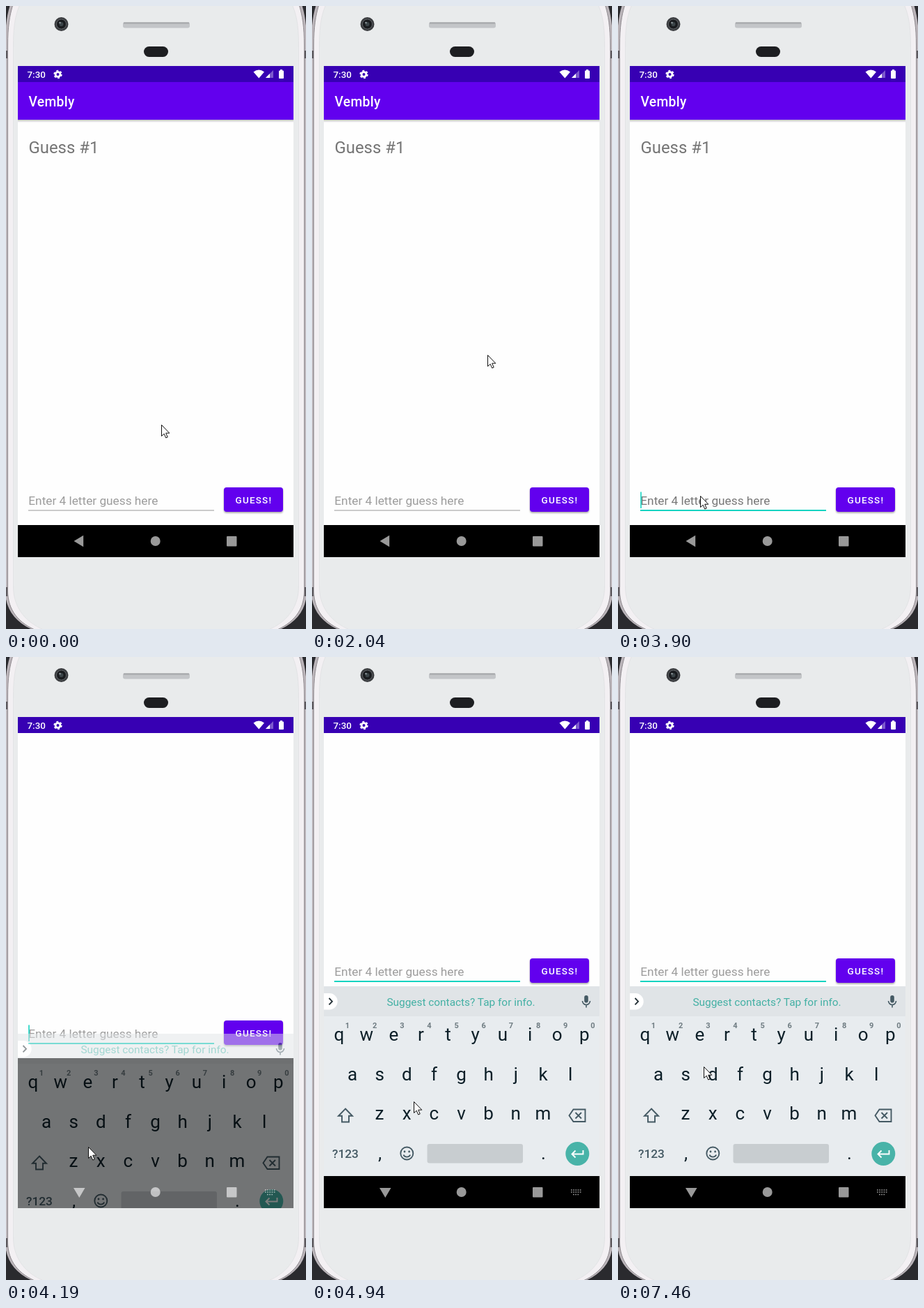
Write an HTML page that moves like this. It is 431 px wide and 893 px high and loops after 8000 ms.

```html
<!DOCTYPE html>
<html lang="en">
<head>
<meta charset="utf-8">
<title>Word game</title>
<style>
html, body { margin: 0; width: 100%; height: 100%; overflow: hidden; background: #2a2a2e; }
svg { display: block; font-family: Roboto, sans-serif; }
.mid { text-anchor: middle; }
.line { fill: none; stroke: #455a64; stroke-width: 1.9; }
</style>
</head>
<body>
<svg width="431" height="893" viewBox="0 0 431 893">
  <defs>
    <linearGradient id="shade" x2="0" y2="1">
      <stop stop-color="#000" stop-opacity=".25"/><stop offset="1" stop-color="#000" stop-opacity="0"/>
    </linearGradient>
    <filter id="lift" x="-10%" y="-10%" width="120%" height="130%">
      <feDropShadow dx="0" dy="1.7" stdDeviation="1" flood-opacity=".35"/>
    </filter>
    <clipPath id="screen"><path d="M17 109h396v681H17z"/></clipPath>
  </defs>

  <!-- phone body -->
  <path d="M6 -2C1 14 -1 30 -1 50V843C1 868 16 886 43 896H388C415 886 430 868 432 843V50C432 30 430 14 425 -2Z" fill="#bbb5ba"/>
  <path d="M0 64h2.500v11H0zM428.500 64h2.500v11h-2.500zM0 833h2.500v13H0zM428.500 833h2.500v13h-2.500z" fill="#5c595e"/>
  <path d="M10 -2C5 14 2.500 30 2.500 56V838C2.500 866 18 885 46 896H385C413 885 428.500 866 428.500 838V56C428.500 30 426 14 421 -2Z" fill="#f3f0f3" stroke="#918c91"/>
  <path d="M20 -2C13 14 10.500 30 10.500 60V832C10.500 862 28 886 62 897H369C403 886 420.500 862 420.500 832V60C420.500 30 418 14 411 -2Z" fill="#e9ebec" stroke="#e2e3e5"/>
  <circle cx="79.500" cy="26" r="10" fill="#3c3e41"/>
  <circle cx="79.500" cy="26" r="7" fill="#191b1e" stroke="#606367"/>
  <circle cx="79.500" cy="26" r="3" fill="#3b4448"/>
  <circle cx="77.500" cy="24" r="1.300" fill="#8d979b"/>
  <rect x="168" y="23" width="96" height="8.500" rx="3" fill="#c3c5c8"/>
  <path d="M169 24.500h94" stroke="#a7a9ac" stroke-width="2"/>
  <rect x="198" y="58" width="35" height="15" rx="7.500" fill="#1d1e21"/>

  <!-- status bar -->
  <path d="M17 86h396v24H17z" fill="#3700b3"/>
  <g fill="#fff">
    <text x="30.500" y="103" font-size="13.400" font-weight="500">7:30</text>
    <circle cx="74.500" cy="98" r="3.400" fill="none" stroke="#fff" stroke-width="2.800"/>
    <circle cx="74.500" cy="98" r="5.300" fill="none" stroke="#fff" stroke-width="1.800" stroke-dasharray="2.800 2.750"/>
    <path d="M355.500 94.500Q363.300 88.500 371 94.500L363.300 103.500Z"/>
    <path d="M384 92v11h-11z" opacity=".35"/><path d="M379 97v6h-6z"/>
    <rect x="392" y="92.500" width="7" height="11.500" rx="1"/><path d="M394 91h3v2h-3z"/>
  </g>

  <g clip-path="url(#screen)">
    <path d="M17 109h396v681H17z"/>
    <g id="app">
      <path d="M17 109h396v635H17z" fill="#fefefe"/>
      <path d="M17 163h396v4H17z" fill="url(#shade)"/>
      <path d="M17 109h396v54H17z" fill="#6200ee"/>
      <text x="32.500" y="143.500" font-size="19.300" font-weight="500" letter-spacing=".3" fill="#fff">Vembly</text>
      <text x="32.500" y="211" font-size="23.900" fill="#757575">Guess #1</text>
      <text id="hint" x="32.300" y="715" font-size="17.250">Enter 4 letter guess here</text>
      <path id="rule" d="M32 723h267"/>
      <path id="caret" d="M33 696.500v23.500" stroke="#14d3c1" stroke-width="1.600"/>
      <rect x="313" y="690" width="85" height="35" rx="4" fill="#6200ee" filter="url(#lift)"/>
      <text x="329.500" y="713" font-size="13.500" font-weight="500" letter-spacing="1.200" fill="#fff">GUESS!</text>
    </g>

    <g id="keyboard">
      <path d="M17 472h396v272H17z" fill="#e8ecef"/>
      <path d="M17 472h396v43H17z" fill="#e0e4e7"/>
      <path d="M17 482h8a11.700 11.700 0 0 1 0 23.400h-8z" fill="#fff"/>
      <path class="line" d="M24.500 489l4.500 4.700l-4.500 4.700" style="stroke:#263238"/>
      <text class="mid" x="214" y="500" font-size="15.400" fill="#43b0a4">Suggest contacts? Tap for info.</text>
      <rect x="391.200" y="485" width="5.600" height="10.500" rx="2.800" fill="#455a64"/>
      <path class="line" d="M388.500 493a5.500 5.500 0 0 0 11 0M394 498.500v4" style="stroke-width:1.600"/>
      <g id="keys" class="mid" fill="#0d1f28"></g>
      <path class="line" d="M48 647.500l10 10.300h-5v8.700H43v-8.700h-5z"/>
      <path class="line" d="M375.500 648.500H392.500V666H375.500L369.500 657.200ZM378.500 653l8.500 8.500M387 653l-8.500 8.500"/>
      <circle class="line" cx="136.300" cy="711.500" r="9"/>
      <path class="line" d="M131.500 713.500a5 4.300 0 0 0 9.600 0"/>
      <circle cx="133" cy="709" r="1.400" fill="#455a64"/><circle cx="139.600" cy="709" r="1.400" fill="#455a64"/>
      <rect x="165.500" y="698" width="137.500" height="27.500" rx="3" fill="#c8cdd0"/>
      <circle cx="381.300" cy="712" r="17" fill="#48b3a8"/>
      <path class="line" d="M389.500 707v5.500H374M378.500 707.500l-5 5l5 5" style="stroke:#fff"/>
    </g>

    <g fill="#fff" opacity=".6">
      <path id="back"/>
      <circle cx="214.700" cy="767" r="7"/>
      <rect x="317" y="760" width="14.500" height="14.500" rx="1"/>
      <path id="switcher" d="M372 764h15M372 767h15M375 770.500h9" stroke="#fff" stroke-width="1.700" stroke-dasharray="1.700 1.500"/>
    </g>
  </g>

  <path id="pointer" d="M.5 .5V16.500L4.200 13.200L6.700 19L9.200 18L6.700 12.200H11.800Z" fill="#fff" stroke="#111" stroke-linejoin="round"/>
</svg>
<script>
const $ = id => document.getElementById(id);
const set = (id, attrs) => {
  for (const name in attrs) $(id).setAttribute(name, attrs[name]);
};

const key = (x, y, text, size = 26, extra = '') =>
  $('keys').insertAdjacentHTML('beforeend', `<text x="${x}" y="${y}" font-size="${size}" ${extra}>${text}</text>`);

const PITCH = 39.15;
[['qwertyuiop', 39], ['asdfghjkl', 58], ['zxcvbnm', 97]].forEach(([row, left], r) =>
  [...row].forEach((c, i) => key(left + i * PITCH, 550 + r * 56.6, c)));
for (let i = 0; i < 10; i++)
  key(51 + i * PITCH, 532, (i + 1) % 10, 11, 'font-weight="700" fill="#6f7c82"');
key(97.5, 720, ',');
key(332.5, 720, '.');
key(48, 718, '?123', 17.3, 'font-weight="500" fill="#455a64"');

const FOCUS = 3900, OPEN = 4190, TICK = 145;

// Pointer moves: start, end, bend point, end point
const moves = [
  [150, 300, [180, 565], [194, 553]],
  [600, 870, [199, 554], [205, 554]],
  [1470, 2040, [305, 735], [252, 500]],
  [3430, FOCUS, [115, 884], [118, 702]],
  [4310, 5090, [122, 712], [157, 604]],
  [5240, 6110, [120, 585], [123, 587]]
];

// Each move is a quadratic curve walked in ticks; the first step lands at its start time.
function pointerAt(t) {
  let pos = [223, 600];
  for (const [start, end, bend, goal] of moves) {
    if (t < start) break;
    const steps = Math.round((end - start) / TICK) + 1;
    const gap = (end - start) / (steps - 1);
    const u = Math.min(1, (Math.floor((t - start) / gap) + 1) / steps), v = 1 - u;
    pos = pos.map((p, i) => Math.round(v * v * p + 2 * u * v * bend[i] + u * u * goal[i]));
  }
  return pos;
}

function draw() {
  const t = performance.now() % 8000;
  const focused = t >= FOCUS, open = t >= OPEN;

  // The keyboard fades in by halves while it and the app slide and slow down.
  const frames = open ? 1 + Math.floor((t - OPEN) / 120) : 0;
  const left = Math.max(0, 1 - .49 * frames);
  const appY = Math.ceil(258 * left ** 1.585) - 258;
  const keysY = Math.ceil(260 * left ** 2);
  const caretOn = focused && Math.floor(Math.max(0, t - 4240) / 460) % 2 === 0;

  set('pointer', { transform: `translate(${pointerAt(t)})` });
  set('app', { transform: `translate(0 ${appY})` });
  set('keyboard', { transform: `translate(0 ${keysY})`, opacity: 1 - left });
  set('caret', { opacity: +caretOn });
  set('hint', { fill: focused && !open ? '#777' : '#9c9c9c' });
  set('rule', { stroke: focused ? '#14d3c1' : '#9a9a9a', 'stroke-width': focused ? 2 : 1.2 });
  set('back', { d: open ? 'M97 761h16.500l-8.200 14z' : 'M97.500 767l13.700-8.200v16.400z' });
  set('switcher', { opacity: +open });
  requestAnimationFrame(draw);
}
draw();
</script>
</body>
</html>
```
